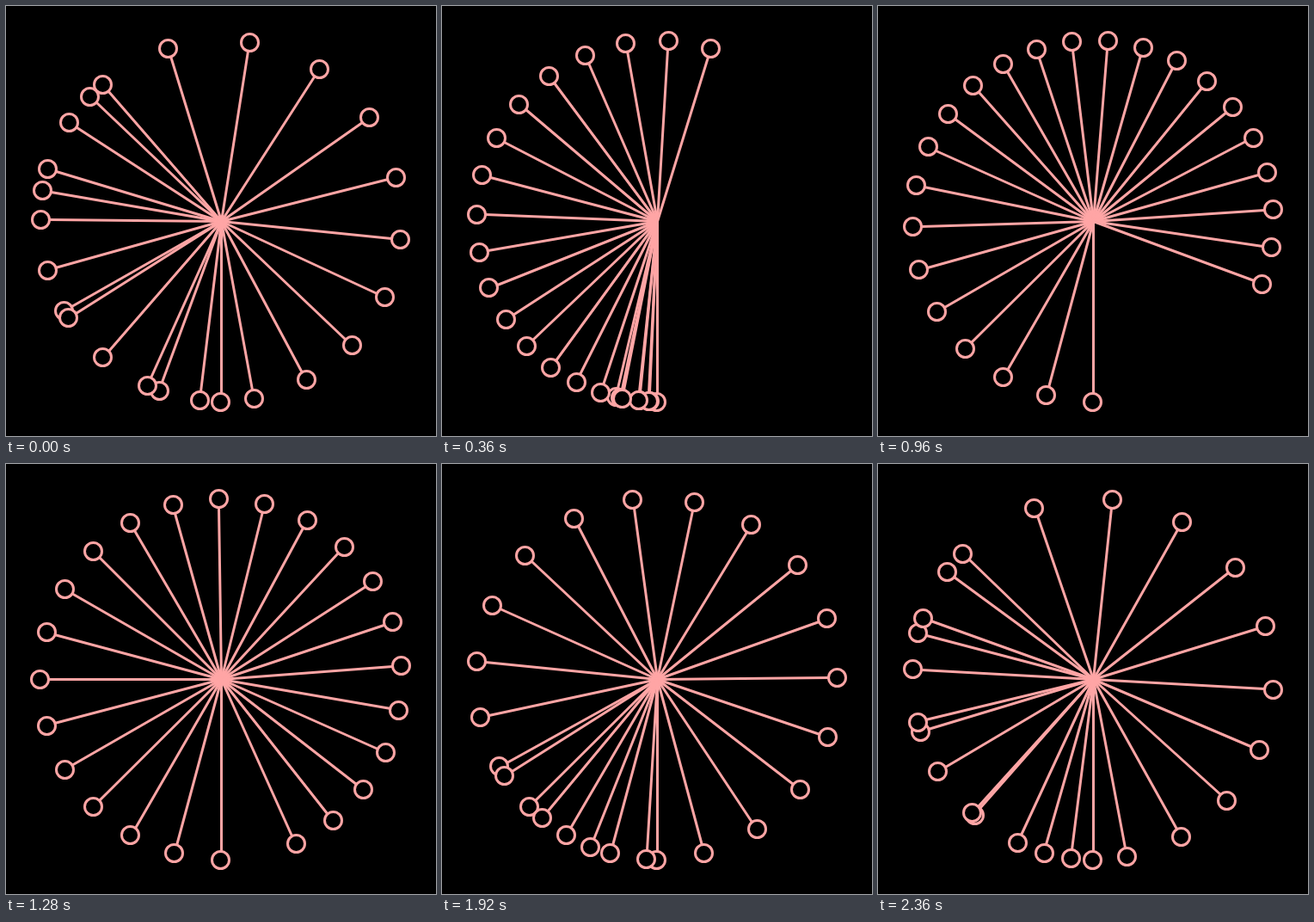
Animation, 500 px wide and 500 px high, one loop 2.4 s. Source, as an HTML page:

```html
<!DOCTYPE html>
<html lang="en">
<head>
<meta charset="utf-8">
<title>Radial wave</title>
<style>
  html, body { margin: 0; width: 100%; height: 100%; overflow: hidden; background: #000; }
  svg { display: block; width: 100vw; height: 100vh; }
</style>
</head>
<body>
<svg id="stage" viewBox="0 0 500 500" fill="#000" stroke="#ffa5a5" stroke-width="3" stroke-linecap="round"></svg>
<script>
const NS = 'http://www.w3.org/2000/svg';
const COUNT = 24, CENTER = 250, ORBIT = 210, RING = 10;
const STEP = 40, STEPS = 60, REST = 35;
const stage = document.getElementById('stage');

function add(name, attrs) {
  const el = document.createElementNS(NS, name);
  for (const key in attrs) el.setAttribute(key, attrs[key]);
  return stage.appendChild(el);
}

const arms = Array.from({ length: COUNT }, () => ({
  line: add('line', { x1: CENTER + 0.5, y1: CENTER + 0.5 }),
  ring: add('circle', { r: RING })
}));

// Points sit on pixel centres.
const snap = v => Math.floor(v) + 0.5;

function ease(p, power) {
  return p < 0.5
    ? 0.5 * Math.pow(2 * p, power)
    : 1 - 0.5 * Math.pow(2 * (1 - p), power);
}

// Degrees clockwise from the bottom; the first arm stays still.
function armAngle(i, p) {
  return i === 0 ? 0 : i * 360 / COUNT + 360 * ease(p, (COUNT + 1) / i);
}

function draw(ms) {
  const n = Math.floor(ms / STEP) % STEPS;
  const p = (n < REST ? n + 26 : n - REST) / STEPS;
  arms.forEach(({ line, ring }, i) => {
    const a = armAngle(i, p) * Math.PI / 180;
    const sin = Math.sin(a), cos = Math.cos(a);
    const inner = ORBIT - RING;
    line.setAttribute('x2', snap(CENTER - inner * sin));
    line.setAttribute('y2', snap(CENTER + inner * cos));
    ring.setAttribute('cx', snap(CENTER - ORBIT * sin - 1e-6));
    ring.setAttribute('cy', snap(CENTER + ORBIT * cos));
  });
}

const start = performance.now();
function tick() {
  draw(performance.now() - start);
  requestAnimationFrame(tick);
}
tick();
</script>
</body>
</html>
```
